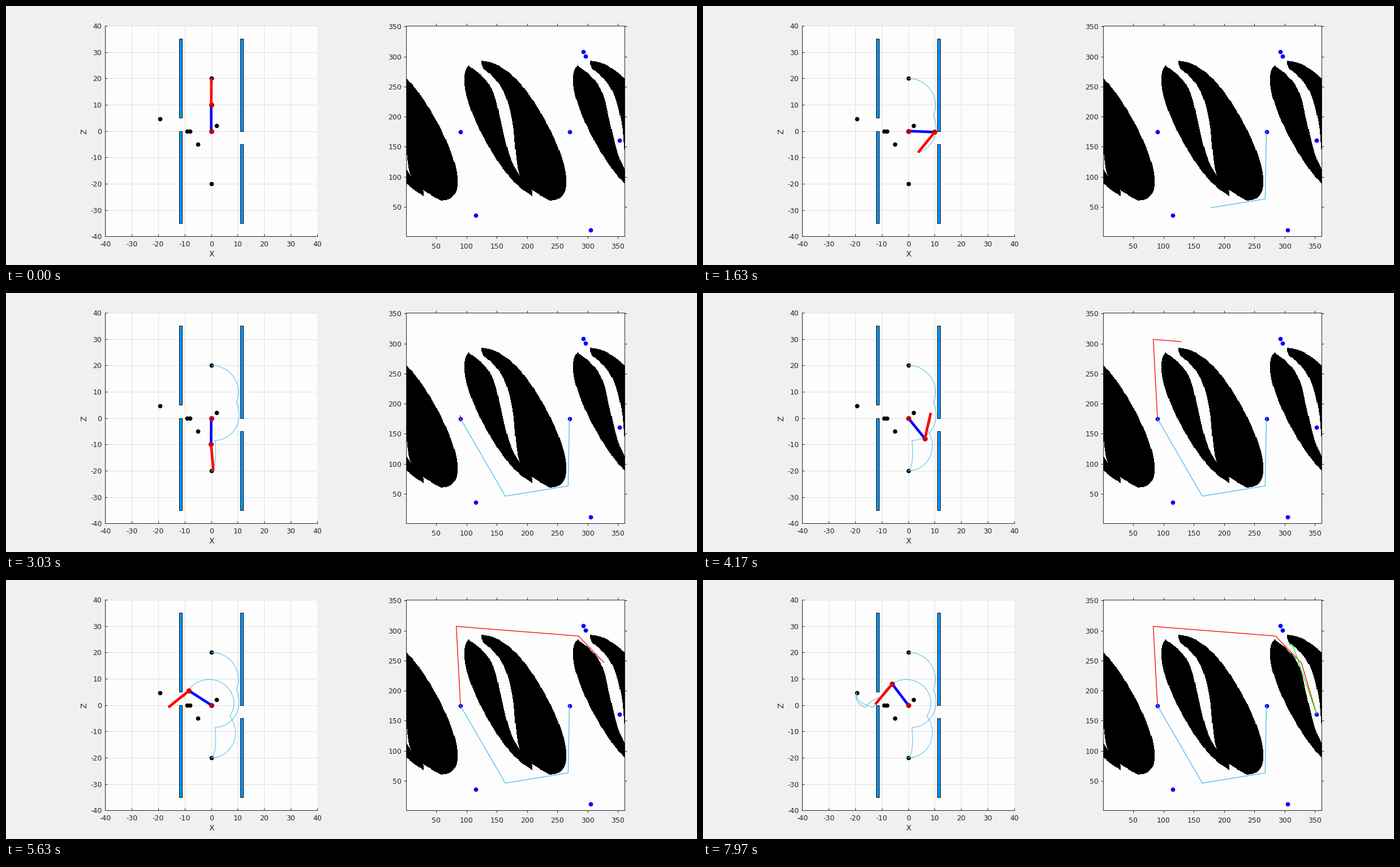
Recreate the animation shown at these times as a matplotlib script. Size 1221 by 459 pixels, loop 8 s.

```python
import numpy as np
import matplotlib.pyplot as plt
from matplotlib.animation import FuncAnimation
from matplotlib.patches import Rectangle

W, H, DPI = 1221, 459, 64
PX = 72 / DPI                     # points per pixel
FRAMES, INTERVAL = 250, 32
STEPS = 240                       # distinct poses in one loop
SEG = 29                          # poses per path segment
LINK, HALF = 10, 0.5              # link length, half its width

PAPER, INK, SKY = "#fdfdfd", "#262626", "#4dbeee"

plt.rcParams.update({
    "font.family": "DejaVu Sans",
    "font.size": 12.5 * PX,
    "axes.unicode_minus": False,
    "axes.linewidth": PX,
    "axes.edgecolor": INK,
    "axes.facecolor": PAPER,
    "text.color": INK,
})

WALLS = [(-12, 5, 30), (-12, -35, 35), (11, 0, 35), (11, -35, 30)]   # x, z, height
GOALS = [(0, 20), (-19.4, 4.6), (-9, 0), (-8, 0), (2, 2), (-5, -5), (0, -20)]
NODES = [(90, 175), (270, 175), (353, 161), (293, 308), (297, 301),
         (115, 36), (305, 11)]
ROUTE = np.array([(270, 175), (268, 63), (164, 46), (90, 175), (83, 307),
                  (285, 291), (328, 246), (353, 161), (314.5, 273), (258, 312)])
LEGS = [(0, 3, SKY), (3, 7, "red"), (7, 9, "#00ff00")]


def unit(angle):
    return np.cos(angle), np.sin(angle)


def blocked():
    """Joint angles at which the outer link overlaps a wall."""
    t1, t2 = np.radians(np.meshgrid(np.arange(-180, 181), np.arange(-175, 176)))
    ux, uz = unit(t1 + t2)
    jx, jz = unit(t1)
    cx, cz = LINK * (jx + ux / 2), LINK * (jz + uz / 2)
    ax, az = abs(ux), abs(uz)
    half = LINK / 2
    hit = np.zeros(t1.shape, bool)
    for x, z, height in WALLS:
        hx, hz = 0.5, height / 2
        dx, dz = x + hx - cx, z + hz - cz
        hit |= ((abs(dx) <= hx + half * ax + HALF * az)
                & (abs(dz) <= hz + half * az + HALF * ax)
                & (abs(dx * ux + dz * uz) <= half + hx * ax + hz * az)
                & (abs(dz * ux - dx * uz) <= HALF + hx * az + hz * ax))
    return hit


def along_route(n):
    """Route position after n poses, with quintic easing on each segment."""
    i, t = n // SEG, (n % SEG) / SEG
    s = (t**3 * (10 - 15 * t + 6 * t * t))[:, None]
    return ROUTE[i] + s * (ROUTE[i + 1] - ROUTE[i])


def arm(path):
    t1, t2 = np.radians(path - (180, 175)).T
    joint = LINK * np.column_stack(unit(t1))
    return joint, joint + LINK * np.column_stack(unit(t1 + t2))


def panel(x0, y0, x1, y1):
    return fig.add_axes([x0 / W, 1 - y1 / H, (x1 - x0) / W, (y1 - y0) / H])


def style_ticks(ax, xpad, ypad, **kw):
    kw.update(length=4 * PX, width=PX, color=INK, labelcolor=INK)
    ax.tick_params(axis="x", pad=xpad * PX, **kw)
    ax.tick_params(axis="y", pad=ypad * PX, **kw)


def line(ax, color, width, z, **kw):
    return ax.plot([], [], color=color, lw=width * PX, zorder=z, **kw)[0]


def dots(ax, points, color, size, z):
    return ax.plot(*np.transpose(points), "o", color=color, ms=size * PX,
                   mew=0, zorder=z)[0]


fig = plt.figure(figsize=(W / DPI, H / DPI), dpi=DPI, facecolor="#f0f0f0")

# Workspace
room = panel(175.3, 34.9, 550, 408.4)
room.set(xlim=(-40, 40), ylim=(-40, 40),
         xticks=range(-40, 41, 10), yticks=range(-40, 41, 10))
room.set_axisbelow(True)
room.grid(color="#e0e0da", lw=PX)
room.spines[["top", "right"]].set_visible(False)
style_ticks(room, 8, 6, direction="in")
for x, y, name, turn in ((363.5, 440, "X", 0), (138, 222, "Z", 90)):
    fig.text(x / W, 1 - y / H, name, rotation=turn, size=13.7 * PX,
             ha="center", va="center")
for x, z, height in WALLS:
    room.add_patch(Rectangle((x, z), 1, height, fc="#0099ff", ec="black",
                             lw=PX, zorder=2))
dots(room, GOALS, "black", 7.7, 3)
trace = line(room, SKY, 1, 4)
inner = line(room, "blue", 4.6, 5, solid_capstyle="butt")
outer = line(room, "red", 4.6, 6, solid_capstyle="butt")
pivots = dots(room, [(0, 0), (0, LINK)], "#b80014", 9, 5.5)

# Joint space
space = panel(707.45, 34.9, 1093.3, 408.4)
shade = np.where(blocked(), 0, 253).astype(np.uint8)
space.imshow(np.dstack([shade] * 3), origin="lower", aspect="auto",
             interpolation="nearest", extent=(0.5, 361.5, 0.5, 351.5))
space.set(xticks=range(50, 351, 50), yticks=range(50, 351, 50))
style_ticks(space, 8, 4, direction="out", top=True, right=True)
legs = [line(space, color, 1.3, 3) for _, _, color in LEGS]
dots(space, NODES, "blue", 7.7, 2.5)

path = along_route(np.arange(STEPS + 1))
joints, tips = arm(path)


def draw(i):
    n = min(i * STEPS // FRAMES + 2, STEPS)
    joint, tip = joints[n], tips[n]
    inner.set_data([0, joint[0]], [0, joint[1]])
    outer.set_data([joint[0], tip[0]], [joint[1], tip[1]])
    pivots.set_data([0, joint[0]], [0, joint[1]])
    trace.set_data(*tips[:n + 1].T)
    for leg, (a, b, _) in zip(legs, LEGS):
        leg.set_data(*path[a * SEG:min(b * SEG, n) + 1].T)
    return [inner, outer, pivots, trace, *legs]


anim = FuncAnimation(fig, draw, frames=FRAMES, interval=INTERVAL,
                     init_func=lambda: draw(0), repeat=True, repeat_delay=0)
plt.show()
```
